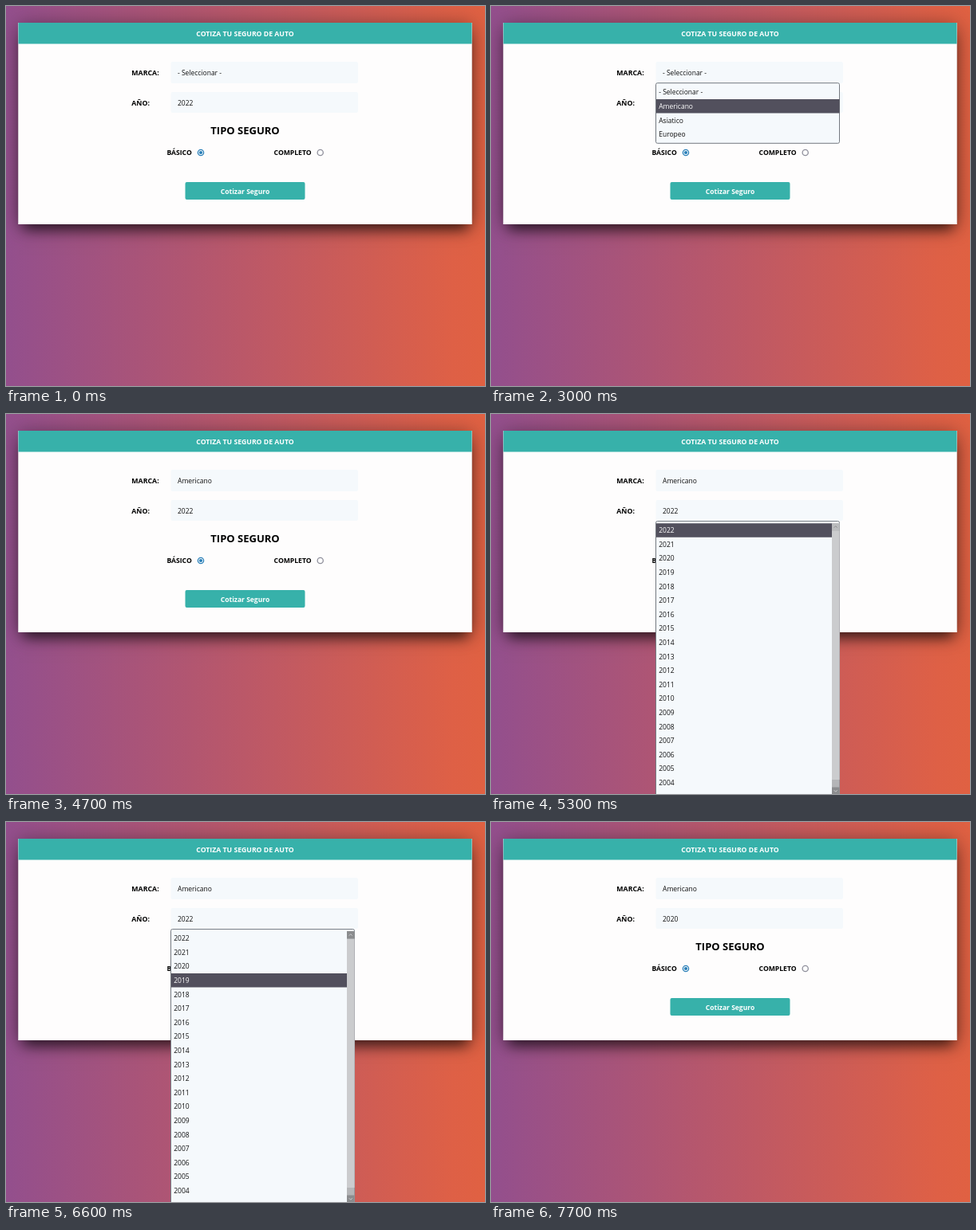
Animation of 600x477 px, one loop 8000 ms. Source, as an HTML page with a canvas:

```html
<!DOCTYPE html>
<html lang="es">
<head>
<meta charset="utf-8">
<title>Cotiza tu seguro</title>
<style>
  html, body { margin: 0; width: 100%; height: 100%; overflow: hidden; }
  canvas { display: block; width: 600px; height: 477px; }
</style>
</head>
<body>
<canvas id="stage"></canvas>
<script>
const W = 600, H = 477, LOOP = 8000, ROW = 17.6;
const FONT = '"Open Sans", "Noto Sans", sans-serif';
const TEAL = '#37b1aa', FIELD = '#f5f9fc', CARD = '#fefdfd', DARK = '#52505d', INK = '#111';
const BRANDS = ['- Seleccionar -', 'Americano', 'Asiatico', 'Europeo'];
const YEARS = Array.from({ length: 20 }, (_, i) => String(2022 - i));

// [time, highlighted row]
const BRAND_MENU = { open: 2000, close: 4700, hover: [[2000, 0], [2700, 1], [3200, 2], [3600, 3], [3900, 2], [4100, 1]] };
const YEAR_MENU = { open: 5300, close: 7600, hover: [[5300, 0], [5600, 1], [5800, 2], [6000, 3], [6800, 2]] };

const canvas = document.getElementById('stage');
const ctx = canvas.getContext('2d');
const dpr = window.devicePixelRatio || 1;
canvas.width = W * dpr;
canvas.height = H * dpr;
ctx.scale(dpr, dpr);

const backdrop = ctx.createLinearGradient(0, 0, W, 0);
[[0, '#934f8d'], [0.5, '#bb5868'], [0.93, '#de6046'], [1, '#e06142']]
  .forEach(([at, color]) => backdrop.addColorStop(at, color));

function rect(x, y, w, h, fill, radius = 0, stroke) {
  ctx.beginPath();
  ctx.roundRect(x, y, w, h, radius);
  ctx.fillStyle = fill;
  ctx.fill();
  if (stroke) {
    ctx.strokeStyle = stroke;
    ctx.lineWidth = 1;
    ctx.stroke();
  }
}

function text(str, x, y, { size = 8.5, weight = 400, color = INK, align = 'left' } = {}) {
  ctx.font = `${weight} ${size}px ${FONT}`;
  ctx.textAlign = align;
  ctx.fillStyle = color;
  ctx.fillText(str, x, y);
}

function shadow(dy, blur, spread, alpha) {
  ctx.save();
  ctx.shadowColor = `rgba(0,0,0,${alpha})`;
  ctx.shadowBlur = blur * dpr;
  ctx.shadowOffsetY = dy * dpr;
  rect(15.5 - spread, 21 - spread, 568 + 2 * spread, 253 + 2 * spread, CARD);
  ctx.restore();
}

function radio(x, y, on) {
  ctx.beginPath();
  ctx.arc(x, y, 3.6, 0, 7);
  ctx.fillStyle = '#fff';
  ctx.fill();
  ctx.strokeStyle = on ? '#2a7fb8' : '#8f8f9b';
  ctx.lineWidth = 1.3;
  ctx.stroke();
  if (!on) return;
  ctx.beginPath();
  ctx.arc(x, y, 2.1, 0, 7);
  ctx.fillStyle = '#2a7fb8';
  ctx.fill();
}

function arrow(x, y, dir, color) {
  ctx.beginPath();
  ctx.moveTo(x - 2, y + dir);
  ctx.lineTo(x, y - dir);
  ctx.lineTo(x + 2, y + dir);
  ctx.strokeStyle = color;
  ctx.lineWidth = 0.9;
  ctx.stroke();
}

function form(brand, year) {
  rect(0, 0, W, H, backdrop);
  shadow(3, 24, 0, 0.4);
  shadow(12, 16, -6, 0.6);
  rect(15.5, 21, 568, 253, CARD);
  rect(15.5, 21, 568, 26.5, TEAL);
  text('COTIZA TU SEGURO DE AUTO', 299.5, 38, { size: 8.7, weight: 700, color: '#fff', align: 'center' });

  const label = { size: 8.8, weight: 700, color: '#000' };
  text('MARCA:', 157.3, 87, label);
  text('AÑO:', 157.3, 124.8, label);
  rect(206.5, 70, 234.5, 27, FIELD, 2);
  rect(206.5, 108, 234.5, 26, FIELD, 2);
  text(brand, 215, 87);
  text(year, 215, 124.8);

  text('TIPO SEGURO', 299.5, 160.6, { size: 13, weight: 700, color: '#000', align: 'center' });
  const kind = { size: 8.6, weight: 700, color: '#000' };
  text('BÁSICO', 201.5, 187, kind);
  text('COMPLETO', 335.6, 187, kind);
  radio(244, 184, true);
  radio(393.7, 184, false);

  rect(224.5, 221, 150, 22, TEAL, 2);
  text('Cotizar Seguro', 299.5, 235.7, { weight: 700, color: '#fff', align: 'center' });
}

function menu(items, top, height, width, active) {
  rect(206.5, top, 230, height, FIELD, 2, '#747980');
  items.forEach((item, i) => {
    const y = top + 2.6 + i * ROW;
    if (i === active) rect(207, y, width, ROW, DARK);
    text(item, 210.2, y + 12, { color: i === active ? '#fff' : INK });
  });
}

function scrollbar(fresh) {
  rect(427, 137, 9.5, H - 137, '#b4b5b7');
  rect(427, 146.5, 9.5, 312.5, '#cbccce');
  rect(427, 137, 9.5, 9.5, fresh ? '#bcbdbf' : '#8b8c8e');
  rect(427, 468.5, 9.5, 9.5, '#8b8c8e');
  arrow(431.7, 141.7, 1, fresh ? '#88898b' : '#d2d3d5');
  arrow(431.7, 473.2, -1, '#d2d3d5');
}

const isOpen = (m, t) => t >= m.open && t < m.close;
const hovered = (m, t) => m.hover.filter(([at]) => at <= t).pop()[1];

function draw(t) {
  form(BRANDS[t < BRAND_MENU.close ? 0 : 1], YEARS[t < YEAR_MENU.close ? 0 : 2]);
  if (isOpen(BRAND_MENU, t)) menu(BRANDS, 96.7, 75.6, 229.5, hovered(BRAND_MENU, t));
  if (isOpen(YEAR_MENU, t)) {
    menu(YEARS, 134.6, 360, 220, hovered(YEAR_MENU, t));
    scrollbar(t < YEAR_MENU.open + 100);
  }
}

const start = performance.now();
function tick() {
  draw((performance.now() - start) % LOOP);
  requestAnimationFrame(tick);
}
tick();
</script>
</body>
</html>
```
